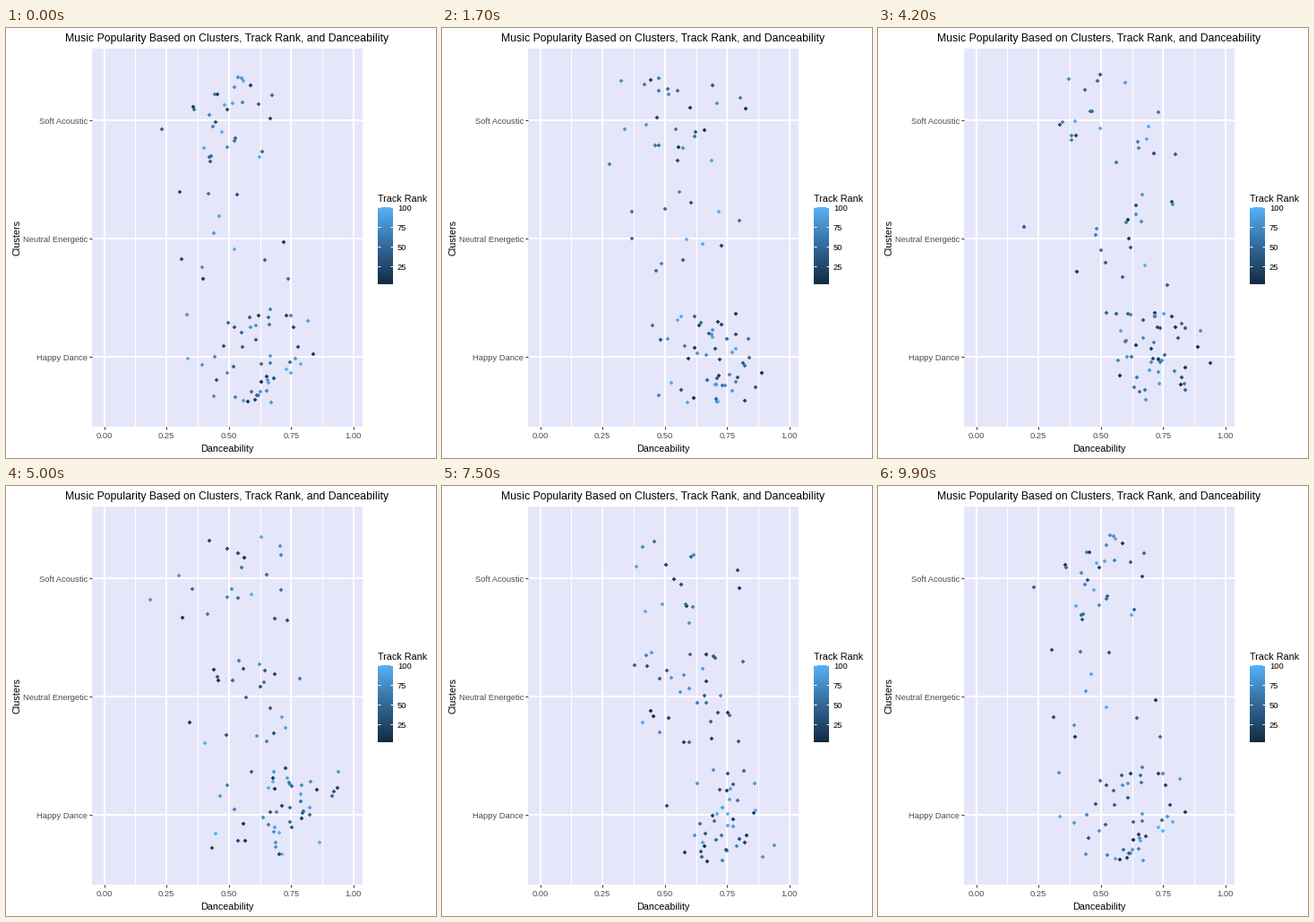
A matplotlib script that plays this animation: 480 by 480 pixels, repeating every 10000 ms.

```python
import numpy as np
import matplotlib.pyplot as plt
from matplotlib.animation import FuncAnimation
from matplotlib.colors import LinearSegmentedColormap
from matplotlib.patches import Rectangle

plt.rcParams["font.family"] = "Liberation Sans"

SIZE, DPI = 480, 80
PT = 72 / DPI                        # points per pixel
FRAMES, INTERVAL = 100, 100
LEFT, RIGHT, TOP, BOTTOM = 96, 398, 23, 445
X0, X_UNIT = 109.6, 278.3            # danceability 0 and its unit length
ROWS = {"Soft Acoustic": 102.7, "Neutral Energetic": 234.7, "Happy Dance": 366.7}
JITTER = 53
TRACKS, LAST_YEAR = 92, 51
BLUES = LinearSegmentedColormap.from_list("rank", ["#132B43", "#336A98", "#56B1F7"])
GREY, DARK = "#4D4D4D", "#333333"


def x_pos(value):
    return X0 + X_UNIT * value


def cluster_trend(t):
    """Count, mean and spread of danceability per cluster, for t from 0 to 1."""
    soft = round(30 - 18 * t)
    neutral = round(12 + 38 * t**2)
    return [
        (soft, .51 + .07 * t, .12),
        (neutral, .50 + .14 * t, .14),
        (TRACKS - soft - neutral, .62 + .14 * t**.5, .12 - .03 * t),
    ]


def year_tracks(year):
    """Pixel positions and ranks of one year's tracks."""
    rng = np.random.default_rng(year)
    parts = []
    for row, (n, mean, spread) in zip(ROWS.values(), cluster_trend(year / LAST_YEAR)):
        dance = np.clip(rng.normal(mean, spread, n), .13, .94)
        parts.append(np.column_stack([
            np.round(x_pos(dance)),
            np.round(row + rng.uniform(-JITTER, JITTER, n)),
            rng.uniform(1, 100, n),
        ]))
    return np.vstack(parts)


def year_at(frame):
    """Years pass every 1.94 frames; the last frame is the first year again."""
    return 0 if frame == FRAMES - 1 else int(frame / 1.94 + 0.73)


fig = plt.figure(figsize=(SIZE / DPI, SIZE / DPI), dpi=DPI, facecolor="white")
ax = fig.add_axes([0, 0, 1, 1])
ax.axis("off")


def line(xs, ys, color, width=1, z=1):
    ax.plot(xs, ys, color=color, lw=width * PT, solid_capstyle="butt", zorder=z)


def label(x, y, text, size, color="black", ha="center", **kw):
    ax.text(x, y, text, fontsize=size * PT, color=color, ha=ha,
            va=kw.pop("va", "center_baseline"), **kw)


ax.add_patch(Rectangle((LEFT, TOP), RIGHT - LEFT, BOTTOM - TOP, fc="#E6E6FA", lw=0, zorder=0))
for v in np.arange(.125, 1, .25):
    line([x_pos(v)] * 2, [TOP, BOTTOM], "white")
for v in np.arange(0, 1.1, .25):
    line([x_pos(v)] * 2, [TOP, BOTTOM], "white", 2)
    line([x_pos(v)] * 2, [BOTTOM, BOTTOM + 3], DARK)
    label(x_pos(v), 455, f"{v:.2f}", 9.4, GREY)
for name, y in ROWS.items():
    line([LEFT, RIGHT], [y, y], "white", 2)
    line([LEFT - 3, LEFT], [y, y], DARK)
    label(91, y + 1, name, 9.4, GREY, "right")

label(247, 11, "Music Popularity Based on Clusters, Track Rank, and Danceability", 12.25)
label(247, 469, "Danceability", 10.7)
label(12, 234.5, "Clusters", 10.9, rotation=90, va="center")

# Legend
label(415, 190, "Track Rank", 10.7, ha="left")
ax.imshow(np.linspace(1, 0, 86)[:, None], cmap=BLUES, vmin=0, vmax=1,
          extent=(415, 432, 286, 200), aspect="auto", zorder=1)
for rank in (100, 75, 50, 25):
    y = 200 + (100 - rank) * .877
    line([415, 418.4], [y, y], "white", z=2)
    line([428.6, 432], [y, y], "white", z=2)
    label(437, y + .5, str(rank), 9.4, ha="left")

dots = ax.scatter([], [], s=(3.4 * PT) ** 2, c=[], marker="D", cmap=BLUES,
                  vmin=1, vmax=100, linewidths=0, zorder=3)
ax.set_xlim(0, SIZE)
ax.set_ylim(SIZE, 0)


def draw(frame):
    tracks = year_tracks(year_at(frame))
    dots.set_offsets(tracks[:, :2])
    dots.set_array(tracks[:, 2])
    return (dots,)


anim = FuncAnimation(fig, draw, frames=FRAMES, interval=INTERVAL, repeat=True,
                     repeat_delay=0, blit=False)
plt.show()
```
